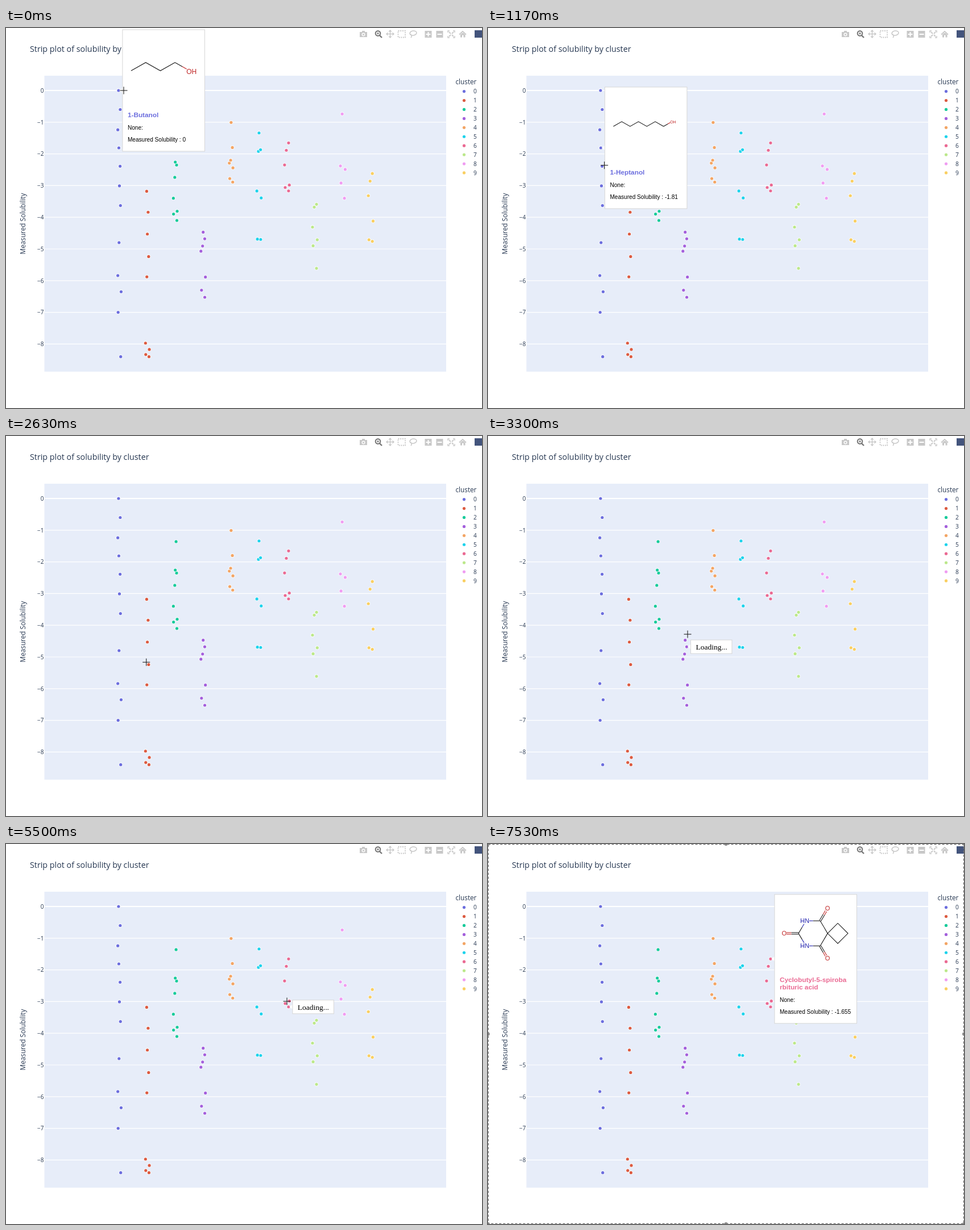
Recreate the animation shown at these times as an HTML page with a canvas. Size 837 px wide and 669 px high, loop 8 s.

```html
<!DOCTYPE html>
<html lang="en">
<head>
<meta charset="utf-8">
<title>Strip plot of solubility by cluster</title>
<style>
html, body { margin: 0; width: 100%; height: 100%; overflow: hidden; background: #fff; }
canvas { display: block; }
</style>
</head>
<body>
<canvas id="stage" width="837" height="669"></canvas>
<script>
const ctx = document.getElementById('stage').getContext('2d');
const LOOP = 8000, FREEZE = 6970, LEAVE = 7530;
const INK = '#273852', RED = '#c02626', BLUE = '#2626b0', BLACK = '#1c1c1c';
const OPEN = '"Open Sans", sans-serif';
const ARIAL = '"Liberation Sans", Arial, sans-serif';
const TIMES = '"Liberation Serif", "Times New Roman", serif';

const yOf = value => 110 - 55.8 * value;

// Solubilities of each cluster, lowest first
const clusters = [
  ['#6c6ede', -8.4, -7, -6.35, -5.84, -4.8, -3.63, -3.01, -2.39, -1.81, -1.24, -0.6, 0],
  ['#dc5b41', -8.4, -8.33, -8.17, -7.97, -5.88, -5.24, -4.53, -3.84, -3.18],
  ['#17cb9b', -4.1, -3.9, -3.81, -3.4, -2.74, -2.35, -2.26, -1.36],
  ['#a460dc', -6.523, -6.301, -5.886, -5.071, -4.907, -4.678, -4.47],
  ['#f3a565', -2.89, -2.78, -2.44, -2.29, -2.2, -1.8, -1.01],
  ['#1ed3ec', -4.7, -4.69, -3.39, -3.17, -1.92, -1.87, -1.34],
  ['#ea6a93', -3.168, -3.06, -2.982, -2.349, -1.886, -1.655],
  ['#bce88b', -5.61, -4.9, -4.71, -4.31, -3.68, -3.59],
  ['#f09df2', -3.4, -2.92, -2.49, -2.38, -0.74],
  ['#f9cf62', -4.76, -4.71, -4.12, -3.32, -2.86, -2.62]
].map(([color, ...values], i) => ({ color, points: strip(values, 199.6 + 49.1 * i) }));

// Sideways jitter: repeatable random numbers, wider where points crowd
function strip(values, center) {
  let seed = 2e9;
  const random = () => {
    const last = seed;
    seed = (69069 * seed + 1) % 2 ** 32;
    return Math.abs(seed - last) < 429496729 ? random() : seed / 2 ** 32;
  };
  const spread = values.map((_, i) =>
    values[Math.min(values.length - 1, i + 5)] - values[Math.max(0, i - 5)]);
  const least = Math.min(...spread);
  return values.map((value, i) => ({
    value,
    x: center + 10.3 * Math.sqrt(least / spread[i]) * (random() - 0.5),
    y: yOf(value)
  }));
}

const points = clusters.flatMap(({ color, points }) => points.map(p => ({ ...p, color })));

// Hover cards by solubility; points without one keep loading
const cards = {
  '0': { name: ['1-Butanol'], draw: () => alcohol(4) },
  '-1.81': { name: ['1-Heptanol'], draw: () => alcohol(7) },
  '-4.8': { name: ['1-Dodecanol'], draw: () => alcohol(12) },
  '-4.47': { name: ['3-', 'Ethanoyloxymethylp', 'henytoin'], draw: () => phenytoin(1), digits: '-4.470000000000001' },
  '-5.071': { name: ['3-', 'Butanoyloxymethylp', 'henytoin'], draw: () => phenytoin(3), digits: '-5.071000000000001' },
  '-3.168': { name: ['Cycloheptyl-5-spirob', 'arbituric acid'], draw: () => spiro(7) },
  '-2.349': { name: ['Cyclopentyl-5-spirob', 'arbituric acid'], draw: () => spiro(5) },
  '-1.655': { name: ['Cyclobutyl-5-spiroba', 'rbituric acid'], draw: () => spiro(4) }
};

// Cursor stops: time, x, y
const stops = [
  [30, 207, 110], [590, 206, 180], [700, 204, 213], [1000, 204, 214], [1560, 207, 338], [1700, 207, 338],
  [2000, 204, 379], [2430, 204, 379], [2700, 255, 402], [3200, 351, 371], [3300, 351, 349], [3600, 351, 357],
  [3900, 339, 402], [4400, 339, 402], [5000, 499, 288], [5230, 499, 288], [5330, 490, 281], [5430, 499, 287],
  [5500, 494, 277], [5800, 493, 241], [6070, 493, 241], [6450, 499, 201], [7130, 499, 201], [LEAVE, 776, 680]
];

function cursorAt(t) {
  const next = Math.max(1, stops.findIndex(s => s[0] > t));
  const [t0, x0, y0] = stops[next - 1], [t1, x1, y1] = stops[next];
  const u = Math.max(0, (t - t0) / (t1 - t0)), k = u * u * (3 - 2 * u);
  return [x0 + (x1 - x0) * k, y0 + (y1 - y0) * k];
}

function hoverAt(t) {
  const [x, y] = cursorAt(t);
  const distance = p => Math.hypot(p.x - x, p.y - y);
  const nearest = points.reduce((a, b) => distance(b) < distance(a) ? b : a);
  return distance(nearest) < 20 ? nearest : null;
}

// ---- drawing helpers ----
function text(str, x, y, font, color = INK, align = 'left') {
  ctx.font = font;
  ctx.fillStyle = color;
  ctx.textAlign = align;
  ctx.fillText(str, x, y);
}

function path(points, color, width = 1.1, close = false) {
  ctx.beginPath();
  points.forEach(p => ctx.lineTo(...p));
  if (close) ctx.closePath();
  ctx.strokeStyle = color;
  ctx.lineWidth = width;
  ctx.stroke();
}

function disc(x, y, r, color) {
  ctx.fillStyle = color;
  ctx.beginPath();
  ctx.arc(x, y, r, 0, 7);
  ctx.fill();
}

function rect(x, y, w, h, color) {
  ctx.fillStyle = color;
  ctx.fillRect(x, y, w, h);
}

function plus(x, y, r, color, width) {
  path([[x - r, y], [x + r, y]], color, width);
  path([[x, y - r], [x, y + r]], color, width);
}

// ---- molecules, in card coordinates ----
function bond([x1, y1], [x2, y2], color = BLACK, double = false) {
  const len = Math.hypot(x2 - x1, y2 - y1);
  for (const off of double ? [-1.4, 1.4] : [0]) {
    const dx = -(y2 - y1) / len * off, dy = (x2 - x1) / len * off;
    const mid = [(x1 + x2) / 2 + dx, (y1 + y2) / 2 + dy];
    path([[x1 + dx, y1 + dy], mid], BLACK);
    path([mid, [x2 + dx, y2 + dy]], color);
  }
}

function atom(str, x, y, color, size = 11) {
  const w = str.length * size * 0.72;
  rect(x - w / 2, y - size * 0.5, w, size, '#fff');
  text(str, x, y + size * 0.36, `${size}px ${ARIAL}`, color, 'center');
}

function polygon(cx, cy, r, n, start) {
  return Array.from({ length: n }, (_, i) => {
    const a = start + i * 2 * Math.PI / n;
    return [cx + r * Math.cos(a), cy + r * Math.sin(a)];
  });
}

function benzene(cx, cy, r, start) {
  const inner = polygon(cx, cy, r * 0.78, 6, start);
  path(polygon(cx, cy, r, 6, start), BLACK, 1.1, true);
  for (let i = 0; i < 6; i += 2) path([inner[i], inner[i + 1]], BLACK);
}

function alcohol(n) {
  const step = 103 / n, size = Math.max(6, 12 * step / 25.7);
  const at = i => [15 + step * i, 65 + (i % 2 ? -1 : 1) * step * 0.285];
  path(Array.from({ length: n }, (_, i) => at(i)), BLACK);
  bond(at(n - 1), at(n), RED);
  const [x, y] = at(n);
  atom('OH', x + size * 0.28, y + 1, RED, size);
}

function spiro(n) {
  const r = 12.6 / Math.sin(Math.PI / n), k = 114 / (78 + 2 * r), mid = 68.5;
  ctx.translate(15, mid);
  ctx.scale(k, k);
  ctx.translate(-15, -mid);
  const left = [42, mid], center = [93, mid];
  path(polygon(93 + r, mid, r, n, Math.PI), BLACK, 1.1, true);
  bond(left, [17, mid], RED, true);
  for (const side of [-1, 1]) {
    const y = mid + 22 * side, carbon = [80, y], nitrogen = [55, y], oxygen = [93, mid + 44 * side];
    bond(center, carbon);
    bond(carbon, nitrogen, BLUE);
    bond(left, nitrogen, BLUE);
    bond(carbon, oxygen, RED, true);
    atom('HN', 53, y, BLUE);
    atom('O', ...oxygen, RED);
  }
  atom('O', 17, mid, RED);
}

function phenytoin(n) {
  const chain = [[43, 64]];
  for (let i = 0; i < n; i++) {
    const [x, y] = chain[i];
    chain.push(i % 2 ? [x - 13, y - 2] : [x - 7, y + 11]);
  }
  path(chain, BLACK);
  const acid = [37, 54], ester = [54, 66], methyl = [62, 55], n3 = [75, 57];
  const c2 = [83, 46], nh = [94, 52], c5 = [92, 65], c4 = [81, 68], o2 = [80, 36], o4 = [76, 79];
  bond(chain[0], acid, RED, true);
  bond(chain[0], ester, RED);
  bond(methyl, ester, RED);
  for (const carbon of [methyl, c2, c4]) bond(carbon, n3, BLUE);
  for (const carbon of [c2, c5]) bond(carbon, nh, BLUE);
  bond(c2, o2, RED, true);
  bond(c4, o4, RED, true);
  for (const carbon of [c4, [105, 64], [95, 77]]) bond(c5, carbon);
  benzene(118, 64, 13, Math.PI);
  benzene(97, 89.5, 12.5, -1.7);
  for (const oxygen of [acid, ester, o2, o4]) atom('O', ...oxygen, RED, 6);
  atom('N', ...n3, BLUE, 6);
  atom('NH', 96, 52, BLUE, 6);
}

// ---- chart ----
function toolbar() {
  const grey = '#c8c8c8', dark = '#777';
  rect(622, 7, 13, 9, grey);
  rect(626, 5, 5, 3, grey);
  disc(628.5, 11.5, 3, '#fff');
  disc(628.5, 11.5, 1.6, grey);

  path(polygon(654, 9.5, 4.3, 24, 0), dark, 2, true);
  path([[657, 13], [661, 17]], dark, 2.4);
  plus(654, 9.5, 2, dark, 1.2);

  plus(675.5, 10.5, 6.5, grey, 1.4);
  for (const [x, y] of polygon(0, 0, 1, 4, 0)) {
    const wing = s => [675.5 + 4 * x + 2.2 * s * y, 10.5 + 4 * y + 2.2 * s * x];
    path([wing(1), [675.5 + 6.5 * x, 10.5 + 6.5 * y], wing(-1)], grey, 1.3);
  }
  ctx.setLineDash([2, 1.7]);
  path([[689.5, 5], [702, 5], [702, 16.5], [689.5, 16.5]], grey, 1.8, true);
  ctx.setLineDash([]);

  ctx.lineWidth = 1.5;
  ctx.beginPath();
  ctx.ellipse(716, 9, 6, 4, -0.15, 0, 7);
  ctx.moveTo(711, 11);
  ctx.quadraticCurveTo(715, 13, 712, 17);
  ctx.stroke();

  for (const x of [742.5, 762.5]) {
    rect(x - 6, 5, 12, 12, grey);
    rect(x - 4, 10, 8, 2, '#fff');
  }
  rect(741.5, 7, 2, 8, '#fff');

  for (const sx of [-1, 1])
    for (const sy of [-1, 1]) {
      const x = 783 + 6 * sx, y = 11 + 6 * sy;
      path([[x - 3 * sx, y], [x, y], [x, y - 3 * sy]], grey, 1.4);
      path([[783 + sx, 11 + sy], [783 + 4 * sx, 11 + 4 * sy]], grey, 1.8);
    }
  path([[797, 11.5], [803, 6], [809, 11.5]], grey, 1.7);
  rect(799, 11, 3, 5.5, grey);
  rect(804.5, 11, 3, 5.5, grey);
  rect(801, 9, 4.5, 3.5, grey);

  rect(824, 4, 13, 13, '#43547c');
}

function chart() {
  rect(0, 0, 837, 669, '#fff');
  toolbar();
  text('Strip plot of solubility by cluster', 42, 42, `14.3px ${OPEN}`);
  rect(67.5, 84, 706.5, 521, '#e7edf9');
  for (let i = 0; i <= 8; i++) {
    const y = yOf(-i);
    path([[67.5, y], [774, y]], '#fff', i ? 1.2 : 2);
    text(i ? '\u2212' + i : '0', 66.5, y + 3.7, `10.1px ${OPEN}`, INK, 'right');
  }
  ctx.save();
  ctx.translate(34, 344.5);
  ctx.rotate(-Math.PI / 2);
  text('Measured Solubility', 0, 0, `11.75px ${OPEN}`, INK, 'center');
  ctx.restore();

  text('cluster', 790.5, 99, `11.75px ${OPEN}`);
  clusters.forEach(({ color }, i) => {
    const y = 111.6 + 15.93 * i;
    disc(805.5, y, 2.6, color);
    text(i, 822, y + 3.8, `10.1px ${OPEN}`);
  });
  for (const { x, y, color } of points) {
    disc(x, y, 3.4, '#fff');
    disc(x, y, 2.6, color);
  }
}

// White box with a caret pointing left at (x, y)
function bubble(x, y, w, h) {
  ctx.fillStyle = '#fff';
  ctx.beginPath();
  ctx.moveTo(x + 1.5, y);
  ctx.lineTo(x + 8, y - 5);
  ctx.lineTo(x + 8, y + 5);
  ctx.fill();
  rect(x + 7, y - h / 2, w, h, '#fff');
  ctx.strokeStyle = '#d6d6d6';
  ctx.lineWidth = 1;
  ctx.strokeRect(x + 7, y - h / 2, w, h);
}

function tooltip(t) {
  const seen = Math.min(t, FREEZE) - 70, point = hoverAt(seen);
  if (!point) return;
  const { x, y, value, color } = point, card = cards[value];
  if (!card || hoverAt(seen - 100) !== point) {
    bubble(x, y, 72.5, 24);
    text('Loading...', x + 16, y + 5, `13.5px ${TIMES}`, '#000');
    return;
  }
  const { name, digits, draw } = card;
  const extra = 13 * (name.length - 1), h = 214 + extra + (digits ? 11 : 0);
  const line = (str, baseline) => text(str, 9, baseline + extra, `10.1px ${ARIAL}`, '#000');
  bubble(x, y, 144.5, h);
  ctx.save();
  ctx.translate(x + 7, y - h / 2);
  name.forEach((part, i) => text(part, 9, 154.4 + 13 * i, `bold 11.8px ${ARIAL}`, color));
  line('None:', 175.7);
  line('Measured Solubility : ' + (digits ? '' : value), 197.2);
  if (digits) line(digits, 208.2);
  draw();
  ctx.restore();
}

function selection() {
  ctx.setLineDash([4, 3]);
  path([[0.5, 0.5], [836.5, 0.5], [836.5, 668.5], [0.5, 668.5]], '#707070', 1.4, true);
  ctx.setLineDash([]);
  for (const x of [0, 418.5, 837])
    for (const y of [0, 334.5, 669])
      if (x !== 418.5 || y !== 334.5) disc(x, y, 3, '#888');
}

function frame(now) {
  const t = now % LOOP;
  chart();
  tooltip(t);
  if (t < LEAVE) plus(...cursorAt(t), 6.5, '#222', 1.1);
  if (t >= FREEZE) selection();
  requestAnimationFrame(frame);
}
requestAnimationFrame(frame);
</script>
</body>
</html>
```
